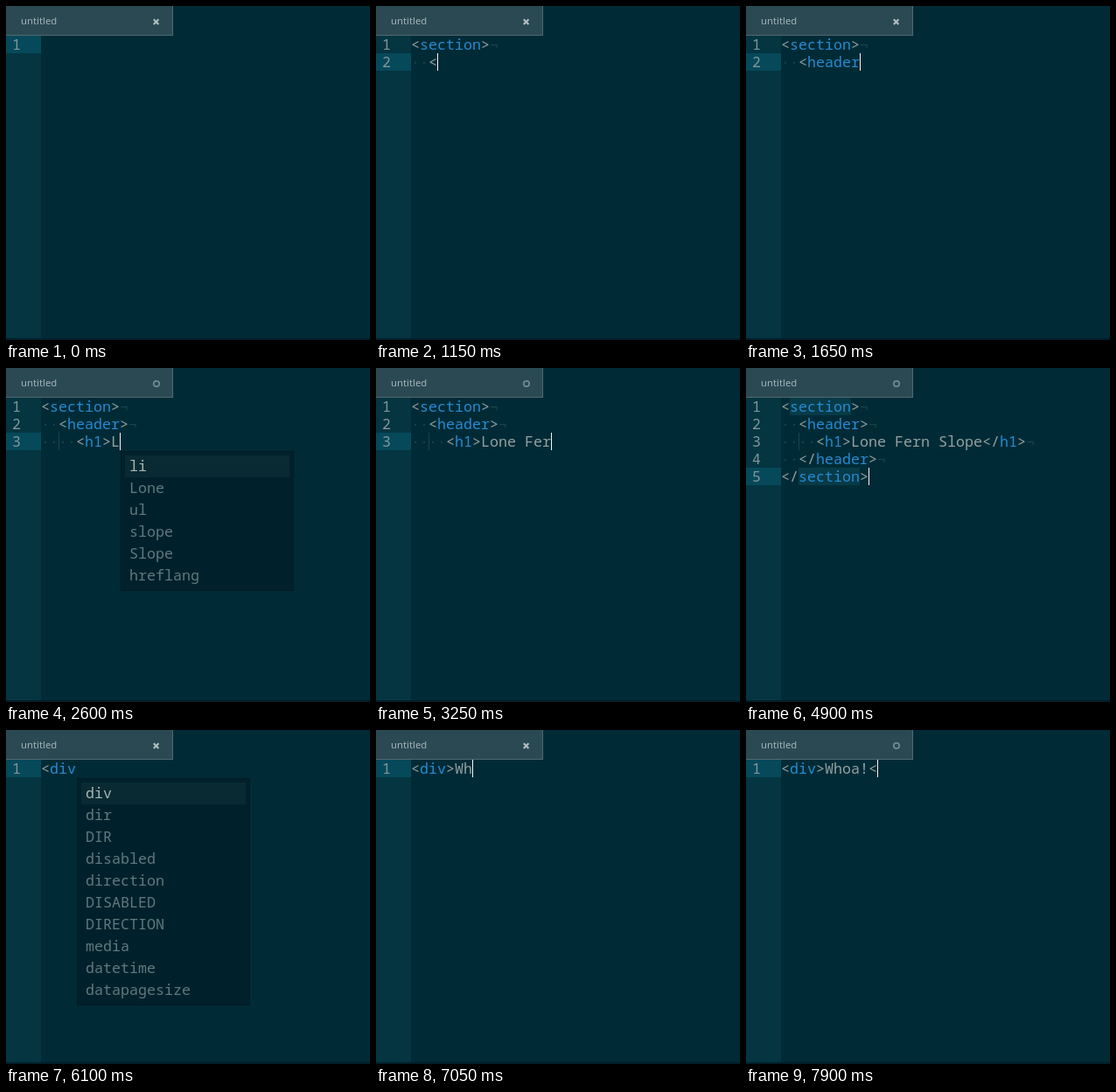
Recreate the animation shown at these times as an HTML page with a canvas. Size 416 px wide and 382 px high, loop 8 s.

```html
<!DOCTYPE html>
<html lang="en">
<head>
<meta charset="utf-8">
<title>Editor typing</title>
<style>
  html, body { margin: 0; width: 100%; height: 100%; overflow: hidden; background: #002b36; }
  canvas { display: block; }
</style>
</head>
<body>
<canvas id="stage" width="416" height="382"></canvas>
<script>
const ctx = document.getElementById('stage').getContext('2d');
const LOOP = 8000, LEFT = 40, TOP = 34, CHAR = 10, LINE = 20, ROW = 25;
const CODE_FONT = '16.67px "Noto Sans Mono", "DejaVu Sans Mono", monospace';
const TAB_FONT = '11.3px "Noto Sans", "Open Sans", sans-serif';
const COLOR = {
  back: '#002b36', gutter: '#043541', active: '#06495a', text: '#93a1a1',
  tag: '#268bd2', number: '#82979b', faint: '#174550', match: '#073b47',
  popup: '#00212b', edge: '#001c25', selected: '#0a2a33', item: '#61787e'
};

// Each burst: start time, delay between keys (0 = all at once), text.
const BURSTS = [
  [350, 75, '<section>'], [1000, 0, '\n  '], [1150, 0, '<'],
  [1300, 60, 'header>'], [1850, 0, '\n    '], [1950, 75, '<h1>'],
  [2500, 0, 'L'], [2700, 50, 'one '], [3050, 75, 'Fern '], [3550, 85, 'Slope'],
  [4100, 0, '<'], [4200, 0, '/h1>'], [4350, 0, '\n  '],
  [4450, 0, '<'], [4550, 0, '/header>'], [4700, 0, '\n'],
  [4800, 0, '<'], [4900, 0, '/section>'],
  [5700, 0, '<'], [5850, 100, 'div'], [6500, 0, '>'],
  [6950, 70, 'Whoa'], [7450, 0, '!'], [7900, 0, '<']
];
const CLEAR = 5550;
const POPUPS = [
  [2550, 2700, 'li Lone ul slope Slope hreflang'],
  [2700, 2850, 'Lone'],
  [3650, 4100, 'slope'],
  [5950, 6500, 'div dir DIR disabled direction DISABLED DIRECTION media datetime datapagesize']
];
const MODIFIED = [[2400, 5850], [7500, LOOP]];
const CURSOR_OFF = [[0, 50], [3900, 4100], [5300, 5550], [6050, 6150]];

const within = (t, spans) => spans.some(([from, to]) => t >= from && t < to);

function textAt(t) {
  let text = '';
  for (const [start, gap, keys] of BURSTS) {
    if (t < start || (t >= CLEAR && start < CLEAR)) continue;
    text += gap ? keys.slice(0, Math.floor((t - start) / gap) + 1) : keys;
  }
  return text;
}

function rect(color, x, y, w, h) {
  ctx.fillStyle = color;
  ctx.fillRect(x, y, w, h);
}

function write(text, x, y, color) {
  ctx.fillStyle = color;
  [...text].forEach((c, i) => {
    if (c !== ' ') ctx.fillText(c, x + i * CHAR, y);
  });
}

function drawTab(modified) {
  rect('#2a4953', 0, 0, 190, 33);
  rect('#506970', 190, 0, 1, 34);
  rect('#506970', 0, 33, 191, 1);
  ctx.font = TAB_FONT;
  ctx.fillStyle = '#a3b2b6';
  ctx.fillText('untitled', 17, 21);
  ctx.lineWidth = modified ? 1.7 : 2.1;
  ctx.strokeStyle = modified ? '#72898f' : '#b2bfc2';
  ctx.beginPath();
  if (modified) {
    ctx.arc(172, 18, 3.2, 0, Math.PI * 2);
  } else {
    ctx.moveTo(168.8, 15.3); ctx.lineTo(174.4, 20.9);
    ctx.moveTo(174.4, 15.3); ctx.lineTo(168.8, 20.9);
  }
  ctx.stroke();
}

// Highlights the tag name just closed and its opening partner.
function drawMatch(lines) {
  const last = lines.length - 1;
  const closed = /<\/(\w+)>$/.exec(lines[last]);
  if (!closed) return;
  const name = closed[1];
  const mark = (row, col) =>
    rect(COLOR.match, LEFT + col * CHAR, TOP + row * LINE, name.length * CHAR, LINE);
  const row = lines.findIndex(line => line.includes('<' + name + '>'));
  mark(row, lines[row].indexOf('<' + name) + 1);
  mark(last, closed.index + 2);
}

function drawLine(line, row, isLast) {
  const top = TOP + row * LINE, base = top + 16;
  const indent = line.search(/\S|$/);
  write(String(row + 1), 7, base, COLOR.number);
  write('·'.repeat(indent), LEFT, base, COLOR.faint);
  if (indent > 2) rect(COLOR.faint, LEFT + 2 * CHAR, top, 1, LINE);
  write(line, LEFT, base, COLOR.text);
  for (const tag of line.matchAll(/<\/?(\w+)/g)) {
    const col = tag.index + tag[0].length - tag[1].length;
    const x = LEFT + col * CHAR;
    ctx.save();
    ctx.beginPath();
    ctx.rect(x, top, tag[1].length * CHAR, LINE);
    ctx.clip();
    const marked = isLast && line.endsWith('>') && tag[0][1] === '/';
    rect(marked ? COLOR.match : COLOR.back, x, top, tag[1].length * CHAR, LINE);
    ctx.restore();
  }
  if (!isLast) write('¬', LEFT + line.length * CHAR, base, COLOR.faint);
}

function drawTags(lines) {
  lines.forEach((line, row) => {
    for (const tag of line.matchAll(/<\/?(\w+)/g)) {
      const col = tag.index + tag[0].length - tag[1].length;
      write(tag[1], LEFT + col * CHAR, TOP + row * LINE + 16, COLOR.tag);
    }
  });
}

function drawPopup(items, x, y) {
  const height = items.length * ROW + 10;
  rect(COLOR.edge, x, y, 198, height);
  rect(COLOR.popup, x + 1, y + 1, 196, height - 2);
  rect(COLOR.selected, x + 5, y + 5, 188, ROW);
  items.forEach((item, i) =>
    write(item, x + 10, y + 23 + i * ROW, i ? COLOR.item : '#a6b4b4'));
}

function draw(t) {
  const lines = textAt(t).split('\n');
  const last = lines.length - 1;
  const x = LEFT + lines[last].length * CHAR, y = TOP + last * LINE;
  rect(COLOR.back, 0, 0, 416, 382);
  rect(COLOR.gutter, 0, TOP, LEFT, 348);
  rect(COLOR.active, 0, y, LEFT, LINE);
  drawTab(within(t, MODIFIED));
  ctx.font = CODE_FONT;
  lines.forEach((line, row) => drawLine(line, row, row === last));
  drawMatch(lines);
  drawTags(lines);
  if (!within(t, CURSOR_OFF)) rect('#f4f7f7', x, y, 1, LINE);
  const popup = POPUPS.find(span => within(t, [span]));
  if (popup) drawPopup(popup[2].split(' '), x + 1, y + LINE + 1);
  rect('#001e29', 0, 380, 416, 2);
}

const begin = performance.now();
function tick() {
  draw((performance.now() - begin) % LOOP);
  requestAnimationFrame(tick);
}
tick();
</script>
</body>
</html>
```
